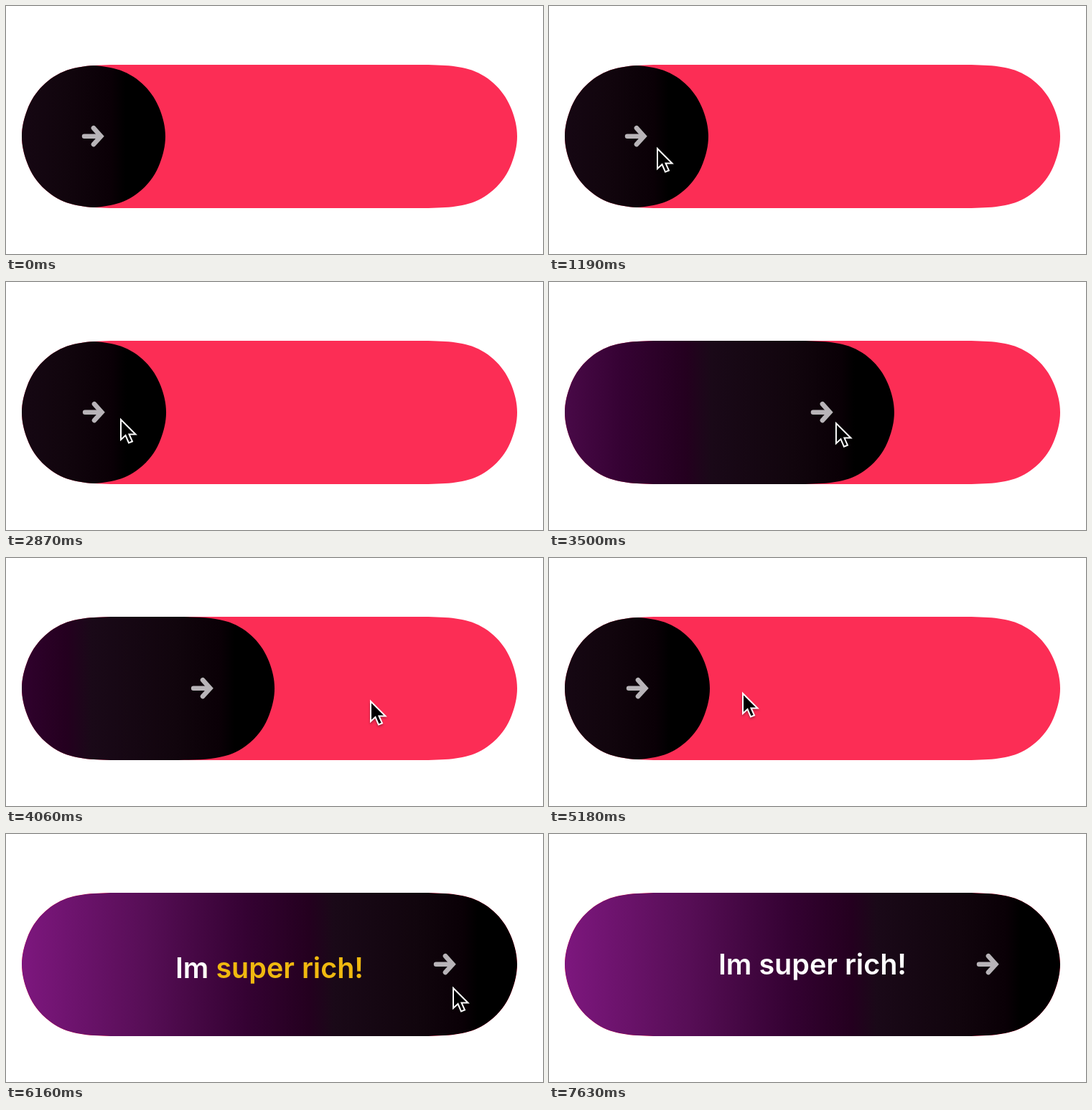
An HTML page that plays this animation: 748x346 px, repeating every 8.05 s.

```html
<!DOCTYPE html>
<html lang="en">
<head>
<meta charset="utf-8">
<title>Slide to confirm</title>
<style>
  html, body { margin: 0; height: 100%; overflow: hidden; background: #fff; }
  svg { display: block; width: 748px; height: 346px; }
  text { font: 600 39.5px Inter, sans-serif; text-anchor: middle; }
  #cursor { filter: drop-shadow(0 2px 1.5px rgba(0, 0, 0, .3)); }
</style>
</head>
<body>
<svg viewBox="0 0 748 346">
  <defs>
    <path id="pill"/>
    <clipPath id="track"><use href="#pill"/></clipPath>
    <linearGradient id="night">
      <stop offset="0" stop-color="#7d177e"/>
      <stop offset=".25" stop-color="#570e56"/>
      <stop offset=".45" stop-color="#350233"/>
      <stop offset=".58" stop-color="#24001f"/>
      <stop offset=".63" stop-color="#1a0918"/>
      <stop offset=".8" stop-color="#11050d"/>
      <stop offset=".89" stop-color="#0a0006"/>
      <stop offset=".92" stop-color="#000"/>
    </linearGradient>
    <linearGradient id="shine" gradientUnits="userSpaceOnUse">
      <stop offset="0" stop-color="#fff"/>
      <stop offset="1" stop-color="#f0b90f"/>
    </linearGradient>
  </defs>
  <use href="#pill" fill="#fc2d55"/>
  <g clip-path="url(#track)">
    <g id="knob">
      <use href="#pill" fill="url(#night)"/>
      <g fill="none" stroke="#b8b4b8" stroke-linecap="round">
        <path d="M599 181.7H620" stroke-width="6.4"/>
        <path d="M612 170.3L622.3 181.7L612 193" stroke-width="6.6"/>
      </g>
    </g>
  </g>
  <text id="label" x="367" y="196" fill="url(#shine)">Im super rich!</text>
  <path id="cursor" d="M1 2V30L7.5 24L12 34.5L17 32.5L12.5 22.5H21.5Z" fill="#000" stroke="#fff" stroke-width="2"/>
</svg>
<script>
const LOOP = 8050, STEP = 70, TRAVEL = 490;
const $ = id => document.getElementById(id);
const clamp = v => Math.min(1, Math.max(0, v));
const ease = (t, from, to) => {
  const p = clamp((t - from) / (to - from));
  return p * p * (3 - 2 * p);
};

// Capsule with continuous-curvature ends
function pillPath(left, top, width, r) {
  const corner = (fx, fy) => (x, y) =>
    `${fx ? left + width - x * r : left + x * r} ${fy ? top + (2 - y) * r : top + y * r}`;
  const toSide = p => `L${p(1.53, 0)}C${p(1.088, 0)} ${p(.868, 0)} ${p(.631, .075)}`
    + `C${p(.373, .169)} ${p(.169, .373)} ${p(.075, .631)}C${p(.03, .75)} ${p(0, .87)} ${p(0, 1)}`;
  const fromSide = p => `C${p(0, .87)} ${p(.03, .75)} ${p(.075, .631)}`
    + `C${p(.169, .373)} ${p(.373, .169)} ${p(.631, .075)}C${p(.868, 0)} ${p(1.088, 0)} ${p(1.53, 0)}`;
  return `M${corner(0, 0)(1.53, 0)}` + toSide(corner(1, 0)) + fromSide(corner(1, 1))
    + toSide(corner(0, 1)) + fromSide(corner(0, 0)) + 'Z';
}
$('pill').setAttribute('d', pillPath(22, 82, 690, 100));

// Pointer stops: time, x, y
const stops = [
  [490, 290, 350], [770, 185, 215], [980, 185, 215], [1190, 150, 197], [1330, 150, 197],
  [1820, 351, 194], [1890, 329, 193], [2870, 159, 190], [3080, 140, 192], [3800, 555, 197],
  [4060, 507, 198], [5180, 269, 187], [5390, 137, 195], [5880, 625, 206], [6160, 622, 213],
  [6900, 610, 216], [7140, 582, 222], [7210, 500, 5], [7280, 480, -60]
];
function pointer(t) {
  const i = stops.findIndex(s => s[0] > t);
  if (i < 1) return [0, -100];
  const [a, b] = [stops[i - 1], stops[i]];
  const p = ease(t, a[0], b[0]);
  return [a[1] + (b[1] - a[1]) * p, a[2] + (b[2] - a[2]) * p];
}

// Pull to a distance, then spring back once released
const pull = (t, start, release, distance, decay) =>
  distance * ease(t, start, release) * Math.exp(-Math.max(0, t - release) / decay);

function knobOffset(t) {
  if (t < 3080) return pull(t, 1330, 1820, 201, 200);
  if (t < 5390) return pull(t, 3080, 3800, 415, 259);
  return TRAVEL * ease(t, 5390, 5880);
}

function draw(t) {
  const front = 285 + (t - 6160) * .4;
  const [x, y] = pointer(t);
  $('knob').setAttribute('transform', `translate(${knobOffset(t) - TRAVEL})`);
  $('cursor').setAttribute('transform', `translate(${x} ${y})`);
  $('label').setAttribute('opacity', ease(t, 5880, 6120));
  $('label').setAttribute('transform', `translate(0 ${20 * (1 - clamp((t - 5880) / 560)) ** 2 * 1})`);
  $('shine').setAttribute('x1', front - 8);
  $('shine').setAttribute('x2', front + 8);
}

function tick(now) {
  draw(Math.floor(now % LOOP / STEP) * STEP);
  requestAnimationFrame(tick);
}
tick(performance.now());
</script>
</body>
</html>
```
